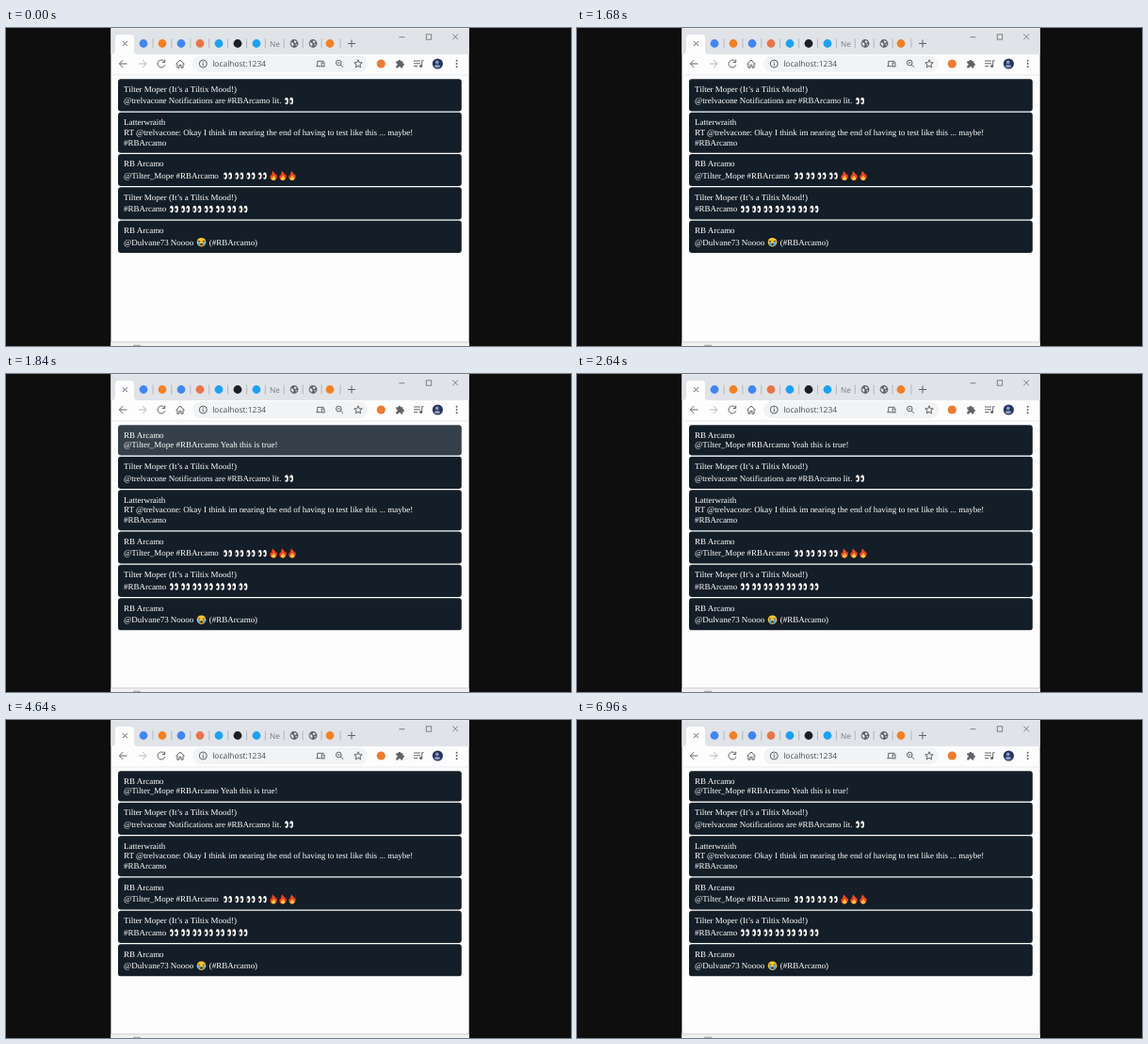
These frames come from a looping animation (600x338 px, 7 s). An HTML page:

```html
<!DOCTYPE html>
<html lang="en">
<head>
<meta charset="utf-8">
<title>Live feed</title>
<style>
  html, body { margin: 0; width: 100%; height: 100%; overflow: hidden; background: #0f0e0f; }
  svg { display: block; width: 600px; height: 338px; }
  text { white-space: pre; text-rendering: geometricPrecision; }
  .feed text { font: 8.97px "Liberation Serif", "Times New Roman", serif; fill: #fff; }
  .ui { font-family: "Open Sans", "Noto Sans", sans-serif; }
  .card { fill: #141e28; }
  .line { fill: none; stroke: #5f6368; stroke-width: 1; }
  .older { animation: push 7s step-end infinite; }
  .newest { animation: appear 7s step-end infinite; }
  .newest .card { animation: settle 7s linear infinite; }
  @keyframes push {
    0% { transform: none; }
    25.14%, 100% { transform: translateY(33.5px); }
  }
  @keyframes appear {
    0% { visibility: hidden; }
    25.14%, 100% { visibility: visible; }
  }
  @keyframes settle {
    0%, 25.14% { fill: #3c4650; }
    32.57%, 100% { fill: #141e28; }
  }
</style>
</head>
<body>
<svg viewBox="0 0 600 338" xmlns="http://www.w3.org/2000/svg">
  <defs>
    <g id="eyes">
      <ellipse cx="2.5" cy="0" rx="1.9" ry="3.7" fill="#fff"/>
      <ellipse cx="7.7" cy="0" rx="1.9" ry="3.7" fill="#fff"/>
      <ellipse cx="1.7" cy=".5" rx="1.1" ry="1.8" fill="#1b1b1b"/>
      <ellipse cx="6.9" cy=".5" rx="1.1" ry="1.8" fill="#1b1b1b"/>
    </g>
    <g id="fire">
      <path d="M4.2-5C5-2.6 7-2.6 7-.6 7.6-1 7.6-1.8 7.5-2.4 9-.6 9 4.8 4.8 4.9 .6 4.9 .5.6 2-1.6 2.1-.6 2.4-.2 3-.1 2.7-2 3-3.6 4.2-5Z" fill="#f0491f"/>
      <path d="M4.8-.4C5.2 1 6.9 1.2 6.8 2.9 6.7 4.3 5.8 4.8 4.7 4.8 2.2 4.7 2.3 2.2 3.2 1.4 3.4 2 3.7 2.2 4 2.2 3.9 1.2 4.1.3 4.8-.4Z" fill="#ffc83d"/>
    </g>
    <g id="sob">
      <circle cx="5.2" cy="0" r="4.8" fill="#fbc531"/>
      <path d="M1.5-1.2H4M6.4-1.2H8.9" stroke="#5a3b12" stroke-width=".9"/>
      <path d="M1.8-.7H3.6V4.4L1.8 3.5ZM6.8-.7H8.6V3.5L6.8 4.4Z" fill="#42a5ef"/>
      <ellipse cx="5.2" cy="2.3" rx="1.4" ry="1.6" fill="#5a3b12"/>
    </g>
    <g id="globe">
      <circle r="4.4" fill="#5f6368"/>
      <path d="M-3.3-1.6-1-.5-.4 1.2-1.3 3.3-3.4.8ZM.4-3.4 2.7-2 1.5-.3-.3-1.3ZM1.4.8 3.3.5 2 2.8Z" fill="#dee1e6"/>
    </g>
  </defs>

  <rect x="111.4" width="380.3" height="338" fill="#fdfdfd"/>
  <rect x="111.4" y=".4" width="380.3" height="27.6" fill="#e0e3e7"/>
  <path d="M112 28Q116 28 116 24V11Q116 7 120 7H132Q136 7 136 11V24Q136 28 140 28Z" fill="#fdfdfd"/>
  <path d="M124 14.2 128.8 19M128.8 14.2 124 19" class="line"/>
  <g id="tabs"></g>
  <use href="#globe" x="306" y="16.5"/>
  <use href="#globe" x="326" y="16.5"/>
  <text x="280" y="19.5" font-size="8.3" fill="#777b80" class="ui">Ne</text>
  <path d="M363 16.5H371M367 12.5V20.5" class="line"/>
  <g class="line" style="stroke:#777;stroke-width:.9">
    <path d="M417.5 9.7H423.5M474.3 6.5 480 12.2M480 6.5 474.3 12.2"/>
    <rect x="446.3" y="6.8" width="5.4" height="5.4"/>
  </g>

  <rect x="198" y="29.2" width="186" height="17.8" rx="8.9" fill="#f1f3f4"/>
  <path d="M111.4 50H491.7" stroke="#dfe1e4" stroke-width=".7"/>
  <g class="line">
    <path d="M128.5 38H120.5M124.2 34.1 120.3 38 124.2 41.9"/>
    <path d="M141 38H149M145.2 34.1 149.1 38 145.2 41.9" stroke="#b5b8bb"/>
    <path d="M168.2 35.6A4 4 0 1 0 168.8 39.2M168.7 33.6V36.5H165.8"/>
    <path d="M180.4 38.4 185 34 189.6 38.4M181.9 37.5V42.2H184V39.3H186V42.2H188.1V37.5"/>
    <circle cx="209.3" cy="38" r="4"/>
    <path d="M209.3 37.3V40.4M209.3 35.5V36.5"/>
    <path d="M329.3 40.7H334.5M330.7 40.2V35.3H337.6"/>
    <rect x="335.2" y="37" width="2.8" height="3.9"/>
    <circle cx="353.3" cy="37" r="2.8"/>
    <path d="M355.4 39.1 358.1 41.8M352 37H354.6"/>
    <path d="M374 33.8 375.2 36.7 378.2 36.9 375.9 38.9 376.6 41.9 374 40.3 371.4 41.9 372.1 38.9 369.8 36.9 372.8 36.7Z"/>
    <path d="M433 35H440M433 37.8H440M433 40.6H437M441.7 40.3V34.7H443.6"/>
  </g>
  <circle cx="440.6" cy="40.6" r="1.5" fill="#5f6368"/>
  <text x="219.2" y="41" font-size="8.45" fill="#4a4d51" class="ui">localhost:1234</text>
  <circle cx="398.3" cy="38" r="4.6" fill="#ee7b30"/>
  <path d="M414.3 35.3H416.4A1.5 1.5 0 0 1 419.4 35.3H421.4V37.3A1.5 1.5 0 0 1 421.4 40.3V42.4H419.3A1.4 1.4 0 0 0 416.5 42.4H414.3V40.2A1.4 1.4 0 0 0 414.3 37.4Z" fill="#5f6368"/>
  <circle cx="458.4" cy="38" r="5.6" fill="#26365f"/>
  <circle cx="457.8" cy="36.4" r="1.8" fill="#8d9bc0"/>
  <ellipse cx="458" cy="40.6" rx="3" ry="1.7" fill="#8d9bc0"/>
  <g fill="#5f6368">
    <circle cx="478.6" cy="34.7" r="1"/>
    <circle cx="478.6" cy="38" r="1"/>
    <circle cx="478.6" cy="41.3" r="1"/>
  </g>

  <g class="feed">
    <g class="older" id="older"></g>
    <g class="newest" id="newest"></g>
  </g>

  <rect x="111.4" y="334" width="380.3" height="4" fill="#f1f1f1"/>
  <path d="M111.4 333.9H491.7" stroke="#c4c4c4" stroke-width=".8"/>
  <path d="M135.5 338V337.3H142.5V338" fill="none" stroke="#888" stroke-width=".8"/>
</svg>
<script>
  const byId = id => document.getElementById(id);
  const text = (y, str, x = 125) => `<text x="${x}" y="${y}">${str}</text>`;
  const icons = (name, x, y, count = 1, step = 12.25) => Array.from({ length: count },
    (_, i) => `<use href="#${name}" x="${x + i * step}" y="${y}"/>`).join('');

  // Emoji make the second line of a card taller.
  const card = (top, height, lines, emoji = '') => {
    const lead = emoji ? 12.5 : 10.65;
    return `<rect class="card" x="119" y="${top}" width="364.8" height="${height}" rx="3"/>` +
      lines.map((str, i) => text(top + 13.5 + i * lead, str)).join('') + emoji;
  };

  const fan = 'Tilter Moper (It’s a Tiltix Mood!)';
  const host = 'RB Arcamo';
  const tag = '#RBArcamo';

  byId('older').innerHTML =
    card(54.3, 34.2, [fan, `@trelvacone Notifications are ${tag} lit.`],
      icons('eyes', 295.4, 77.5)) +
    card(89.7, 43, ['Latterwraith',
      'RT @trelvacone: Okay I think im nearing the end of having to test like this ... maybe!', tag]) +
    card(133.9, 34.2, [host, `@Tilter_Mope ${tag}`],
      icons('eyes', 230.4, 157.1, 4) + icons('fire', 279.4, 157.1, 3, 9.9)) +
    card(169.3, 34.2, [fan, tag], icons('eyes', 173.3, 192.5, 7)) +
    card(204.7, 34.2, [host, '@Dulvane73 Noooo'],
      icons('sob', 202.3, 227.7) + text(230.7, `(${tag})`, 215.8));

  byId('newest').innerHTML =
    card(54.3, 32.3, [host, `@Tilter_Mope ${tag} Yeah this is true!`]);

  const dot = (x, color) => `<circle cx="${x}" cy="16.5" r="4.4" fill="${color}"/>`;
  const tabs = [[146, '#4285f4'], [166, '#f48024'], [186, '#4285f4'], [206, '#e8754a'],
    [226, '#1da1f2'], [246, '#1b1f23'], [266, '#1da1f2'], [344, '#f48024']];
  const dividers = Array.from({ length: 11 }, (_, i) => `M${156 + i * 19.9} 11.5V21.5`).join('');
  byId('tabs').innerHTML = tabs.map(t => dot(...t)).join('') +
    `<path d="${dividers}" stroke="#a3a7ac" stroke-width=".7"/>`;
</script>
</body>
</html>
```
